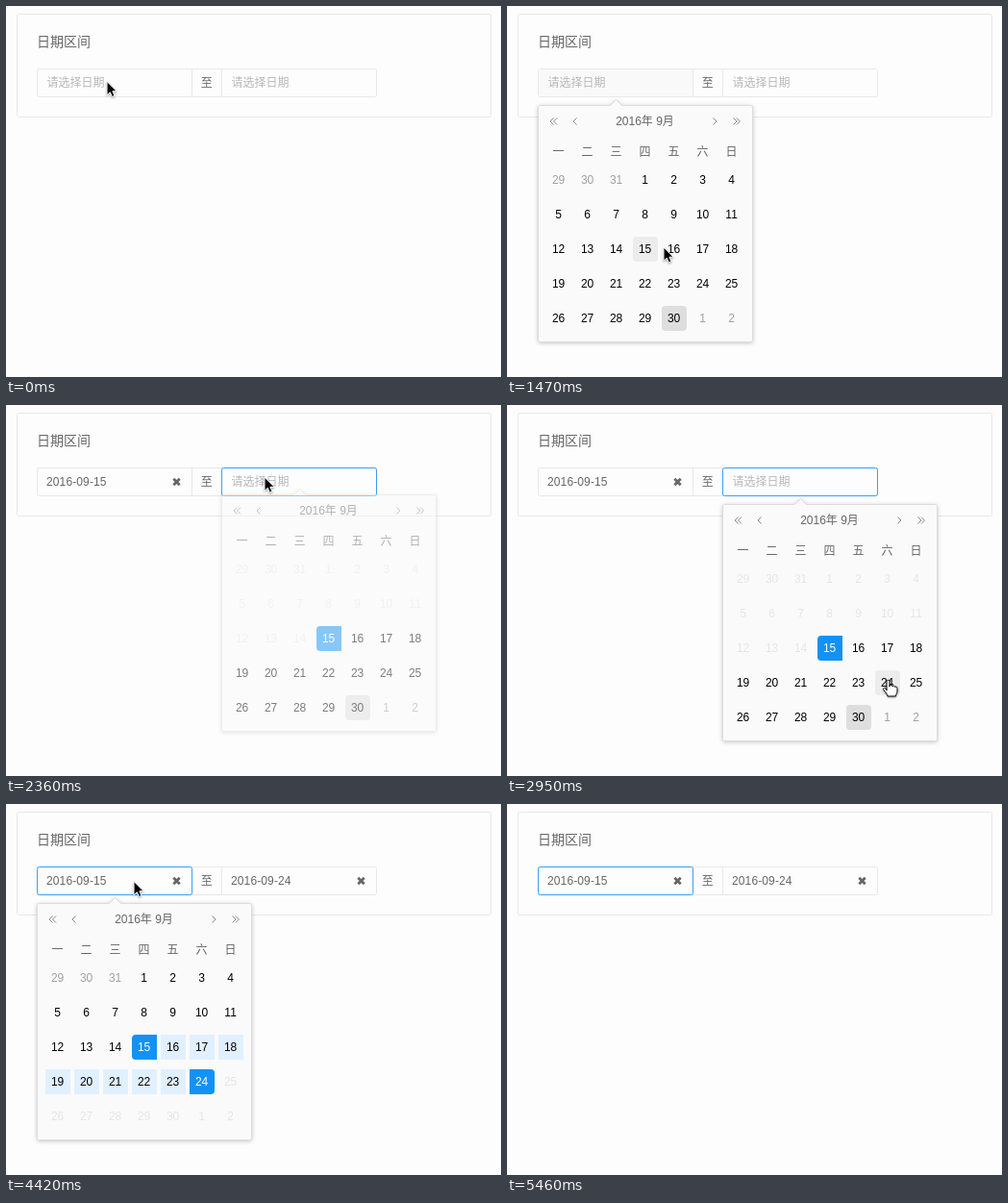
Animation of 515x386 px, one loop 5.76 s. Source, as an HTML page:

```html
<!DOCTYPE html>
<html lang="zh-CN">
<head>
<meta charset="utf-8">
<title>日期区间</title>
<style>
  html, body { margin: 0; width: 100%; height: 100%; overflow: hidden; background: #fdfdfd; }
  svg { display: block; font: 12px "Liberation Sans", "Noto Sans CJK SC", "Noto Sans CJK", Arial, sans-serif; fill: #666; }
  .mid { text-anchor: middle; }
  .line { fill: none; stroke: #e8e8e8; }
  .focus { fill: none; stroke: #3a9ff0; }
  .nav { fill: none; stroke: #8a8a8a; }
  .pop { filter: drop-shadow(0 1px 2px rgba(0, 0, 0, .22)); }
  .cursor { filter: drop-shadow(0 1px 1px rgba(0, 0, 0, .35)); }
</style>
</head>
<body>
<svg id="stage" width="515" height="386" viewBox="0 0 515 386"></svg>
<script>
const LOOP = 5760, STEPS = 39;
const BLUE = '#1392f5';
const FIELDS = [32, 224];
const stage = document.getElementById('stage');

// Pointer path: [step, x, y]
const PATH = [
  [0, 105, 78.5], [3, 105, 78.5], [4, 107, 88], [8, 142, 252], [9, 143, 252],
  [10, 163, 251], [11, 202, 185], [12, 250, 98], [13, 269, 72.5], [17, 269, 76],
  [19, 395, 285], [20, 397, 287], [22, 397, 287], [24, 270, 120], [25, 245, 98.5],
  [26, 222, 94], [28, 135, 81], [30, 133, 80.5], [32, 133, 80.5], [36, 457, 368]
];

// Popups: field index, focus span, open and close steps, enabled days, chosen range
const POPUPS = [
  { field: 0, focus: [2, 9], open: 3, close: 11, min: -9, max: 99 },
  { field: 1, focus: [15, 22], open: 16, close: 23, min: 15, max: 99, from: 15, to: 15 },
  { field: 0, focus: [28, 38], open: 29, close: 36, min: -9, max: 24, from: 15, to: 24 }
];

const text = (x, y, str, attrs = '') => `<text x="${x}" y="${y}" ${attrs}>${str}</text>`;
const path = (d, attrs) => `<path d="${d}" ${attrs}/>`;

function pointer(step) {
  const i = PATH.findIndex(p => p[0] >= step);
  if (i < 0) return null;
  if (i === 0) return PATH[0].slice(1);
  const [a, ax, ay] = PATH[i - 1], [b, bx, by] = PATH[i];
  const k = (step - a) / (b - a);
  return [ax + (bx - ax) * k, ay + (by - ay) * k];
}

// Day number under a point, null when there is none that can be picked
function dayAt(popup, point) {
  if (!popup || !point) return null;
  const x = point[0] - FIELDS[popup.field] - 9, y = point[1] - 168;
  const col = Math.floor(x / 30), row = Math.floor(y / 36);
  if (col < 0 || col > 6 || row < 0 || row > 4 || x % 30 > 26 || y % 36 > 26) return null;
  const day = row * 7 + col - 2;
  return day >= popup.min && day <= popup.max ? day : null;
}

function field(i, value, pressed) {
  const x = FIELDS[i];
  const fill = pressed ? `<rect x="${x + 1}" y="66" width="160" height="28" fill="#f9f9f9"/>` : '';
  if (!value) return fill + text(x + 10.5, 84.4, '请选择日期', 'fill="#b8b8b8"');
  return fill + text(x + 10, 84, value, 'letter-spacing=".12"') +
    path(`M${x + 142.3} 76.8l6.4 6.4m0 -6.4l-6.4 6.4`, 'stroke="#666" stroke-width="2.8"');
}

function cell(popup, i, hover) {
  const day = i - 2, x = 9 + i % 7 * 30, y = 168 + Math.floor(i / 7) * 36;
  const { min, max, from, to } = popup;
  const off = day < min || day > max;
  const label = day < 1 ? day + 31 : day > 30 ? day - 30 : day;
  let color = off ? '#e6e6e6' : day < 1 || day > 30 ? '#a0a0a0' : '#000';
  let box = '';
  const plain = fill => `<rect x="${x}" y="${y}" width="26" height="26" rx="4" fill="${fill}"/>`;
  if (day === from) {
    color = '#fff';
    box = path(`M${x + 26} ${y}h-22q-4 0 -4 4v18q0 4 4 4h22z`, `fill="${BLUE}"`);
  } else if (day === to) {
    color = '#fff';
    box = path(`M${x} ${y}h22q4 0 4 4v18q0 4 -4 4h-22z`, `fill="${BLUE}"`);
  } else if (day > from && day < to) {
    box = `<rect x="${x}" y="${y}" width="26" height="26" fill="#e1f0ff"/>`;
  } else if (day === 30 && !off) {
    box = plain('#dedede');
  } else if (day === hover) {
    box = plain('#ececec');
  }
  return box + text(x + 12.6, y + 17.3, label, `class="mid" fill="${color}"`);
}

function calendar(popup, step, hover) {
  const shown = step === popup.open ? .5 : step === popup.close ? .4 : 1;
  const left = (x, d = 1) => `M${x} 116.5l${-3.5 * d} 3.5l${3.5 * d} 3.5`;
  const days = Array.from({ length: 35 }, (_, i) => cell(popup, i, hover)).join('');
  const week = [...'一二三四五六日'].map((c, i) => text(21.5 + i * 30, 156.2, c, 'class="mid"')).join('');
  return `<g transform="translate(${FIELDS[popup.field]} ${-20 * (1 - shown)})" opacity="${shown}">` +
    path('M2.5 103.5H75.5L81.5 97.5L87.5 103.5H221.5q2 0 2 2V347.5q0 2 -2 2H2.5q-2 0 -2 -2V105.5q0 -2 2 -2z',
      'class="pop" fill="#fafafa" stroke="#dcdcdc"') +
    path(left(16.5) + left(20) + left(40.5) + left(182.5, -1) + left(203.5, -1) + left(207, -1), 'class="nav"') +
    text(111.5, 124.2, '2016年 9月', 'class="mid"') + week + days + '</g>';
}

function cursor([x, y], hand) {
  const shape = hand
    ? path('M-2 10V.8C-2 -1.2 1 -1.2 1 .8V6V5C1.5 3.6 4 4 4 5.8C4.5 4.4 6.6 4.8 6.8 6.6C7.4 5.6 9 6 9 7.6V11C9 13 7.5 14 7.5 16H-1C-1 14 -3 12.5 -5 9.6C-6.4 7.4 -4 6.6 -2 9Z',
      'fill="#fff" stroke="#000"')
    : path('M0 0V14.2L3.3 11.2L5.4 16L8 14.9L5.9 10.2H10.2Z', 'fill="#000" stroke="#fff"');
  return `<g class="cursor" transform="translate(${x} ${y})">${shape}</g>`;
}

function scene(step) {
  const point = pointer(step);
  const popup = POPUPS.find(p => step >= p.open && step <= p.close);
  const focused = POPUPS.find(p => step >= p.focus[0] && step <= p.focus[1]);
  // Hover trails the pointer by one step
  const hover = dayAt(popup, pointer(Math.max(0, step - 1)));
  const hand = hover !== null && hover === dayAt(popup, point);
  return '<rect class="line" x="11.5" y="8.5" width="493" height="107" rx="2"/>' +
    text(32, 42, '日期区间', 'font-size="14"') +
    '<rect class="line" x="32.5" y="65.5" width="353" height="29" rx="2"/>' +
    field(0, step > 10 && '2016-09-15', step === 10) +
    field(1, step > 22 && '2016-09-24') +
    path('M193.5 66V94M224.5 66V94', 'class="line"') +
    text(208.7, 84.4, '至', 'class="mid"') +
    (focused ? `<rect class="focus" x="${FIELDS[focused.field] + .5}" y="65.5" width="161" height="29" rx="2"/>` : '') +
    (popup ? calendar(popup, step, hover) : '') +
    (point ? cursor(point, hand) : '');
}

let last = -1;
function tick(now) {
  const step = Math.min(STEPS - 1, Math.floor((now % LOOP + 16) / LOOP * STEPS));
  if (step !== last) stage.innerHTML = scene(last = step);
  requestAnimationFrame(tick);
}
tick(performance.now());
</script>
</body>
</html>
```
